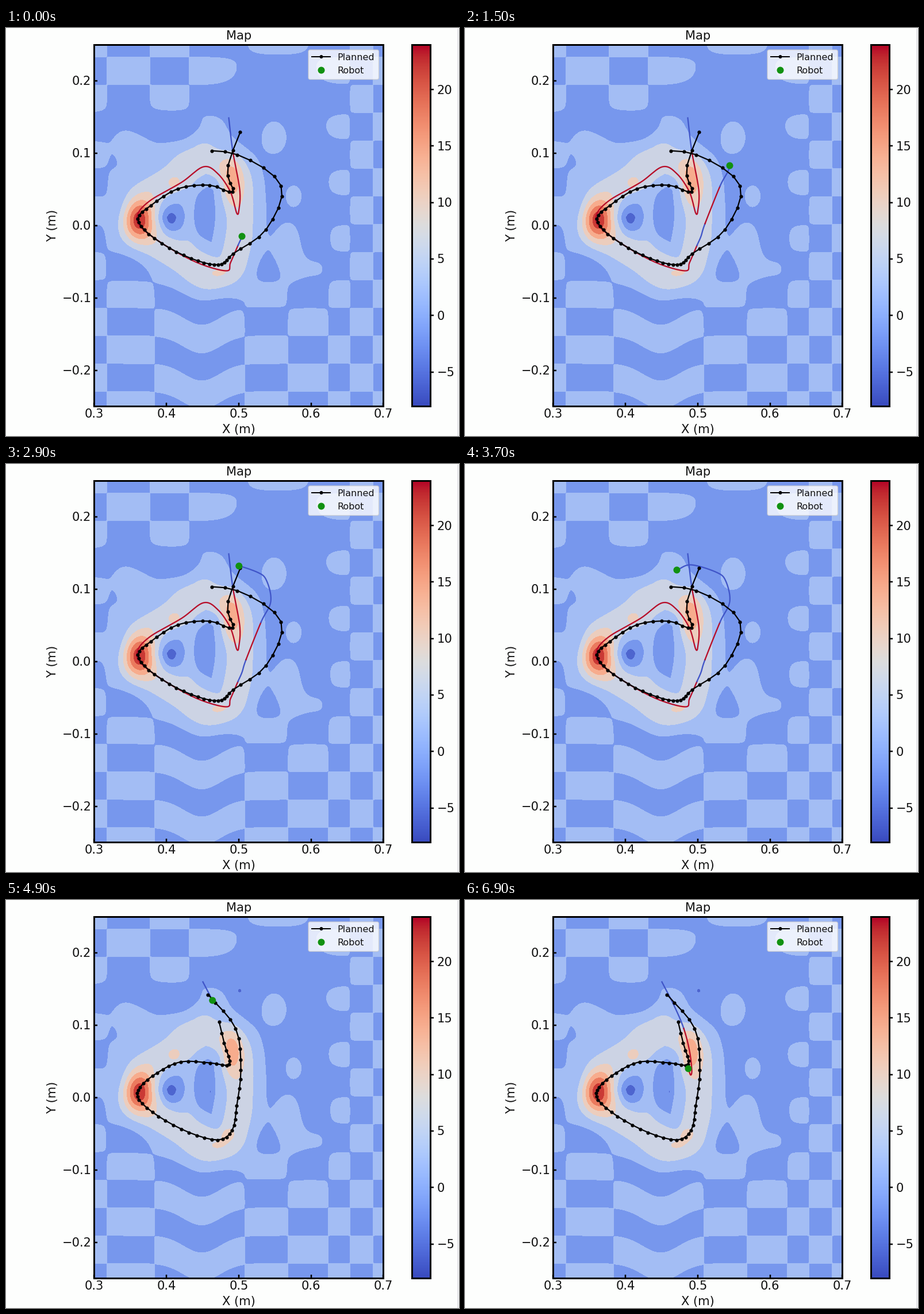
These frames come from a looping animation (788x710 px, 7000 ms). A matplotlib script:

```python
import matplotlib.pyplot as plt
import numpy as np
from matplotlib.animation import FuncAnimation
from matplotlib.patches import Circle, FancyBboxPatch, Rectangle

W, H, DPI = 788, 710, 100
PX = 72 / DPI
LEFT, RIGHT, TOP, BOTTOM = 153, 656, 28, 657
FRAMES, STEP_MS = 70, 100
REPLAN, RESTART = 41, 45
GREEN = "#119111"

plt.rcParams["font.family"] = "DejaVu Sans"
cmap = plt.get_cmap("coolwarm")

fig = plt.figure(figsize=(W / DPI, H / DPI), dpi=DPI, facecolor="#fdfefd")
ax = fig.add_axes([0, 0, 1, 1])
ax.axis("off")


def spline(keys, n):
    """Smooth curve through the keys, n samples per span."""
    p = np.array(keys, float)
    m = np.gradient(p, axis=0)
    t = np.linspace(0, 1, n, endpoint=False)[:, None]
    h = t * t * (3 - 2 * t)
    spans = [(1 - h) * p[i] + h * p[i + 1]
             + t * (1 - t) ** 2 * m[i] - t * t * (1 - t) * m[i + 1]
             for i in range(len(p) - 1)]
    return np.vstack(spans + [p[-1:]])


# ---- height map -------------------------------------------------------

X, Y = np.meshgrid(np.linspace(LEFT, RIGHT, 220), np.linspace(TOP, BOTTOM, 270))


def bump(x, y, sx, sy, height):
    return height * np.exp(-((X - x) / sx) ** 2 / 2 - ((Y - y) / sy) ** 2 / 2)


def plateau(x, y, rx, ry):
    return np.exp(-((X - x) / rx) ** 4 - ((Y - y) / ry) ** 4)


def ripples():
    """Checkered waves whose columns shift from top to bottom."""
    column = np.arange(-1, 8)
    upper = np.interp(X, [95, 175, 250, 318, 415, 530, 598, 638, 675], column)
    lower = np.interp(X, [95, 175, 258, 415, 490, 560, 598, 638, 675], column)
    w = np.clip((Y - 150) / 250, 0, 1)
    u = upper + (lower - upper) * w
    sag = 30 * w * np.exp(-((X - 340) / 45) ** 2)
    v = (Y - 50 - sag) / 48.5
    calm = np.maximum(plateau(470, 250, 95, 185), plateau(330, 320, 130, 110))
    waves = 1.8 * np.sin(np.pi * u) * np.sin(np.pi * v) * (1 - calm) - 1.8 * calm
    waves += bump(255, 170, 60, 15, -3) + bump(222, 215, 21, 18, 4)
    return np.clip(waves, -3, 3)


def ridge():
    """Raised band around a rounded triangle."""
    ring = spline([(345, 228), (397, 250), (408, 300), (404, 360), (390, 410),
                   (360, 420), (310, 398), (260, 372), (230, 335), (250, 290),
                   (300, 255), (345, 228)], 10)
    d2 = np.min([(X - x) ** 2 + (Y - y) ** 2 for x, y in ring], axis=0)
    return 8.4 * np.exp(-d2 / 1200)


def terrain():
    islands = (bump(466, 190, 17.5, 23, 3.6) + bump(500, 291, 10.6, 14, 3.6)
               + bump(490, 381, 18, 34, 3.6))
    peaks = (bump(232, 333, 17.5, 23, 16) + bump(391, 268, 12, 27, 8.5)
             + bump(293, 270, 7, 7, 4))
    hollow = bump(285, 333, 11, 15, -5) + bump(318, 325, 9, 40, 2.5)
    return ripples() + ridge() + islands + peaks + hollow


levels = np.arange(-8, 25, 4)
tones = cmap((levels[:-1] + 10) / 32)[:, :3] * [1, 0.975, 0.96]


def draw_map(height):
    return ax.contourf(X, Y, height, levels=levels, colors=tones,
                       extend="both", zorder=2)


ground = terrain()
new_spots = (bump(405.5, 157.5, 6, 6, -3.2) + bump(355, 333, 3, 6, -3.6)
             + bump(383, 405, 8, 7, 2.5))
first_map, second_map = draw_map(ground), draw_map(ground + new_spots)


# ---- axes, colour bar, legend ------------------------------------------

def text(x, y, s, size=21, **kw):
    ax.text(x, y, s.replace("-", "\u2212"), fontsize=size * PX, color="#111111",
            zorder=12, **kw)


def segment(xs, ys, color="black", width=2.5):
    ax.plot(xs, ys, color=color, lw=width * PX, solid_capstyle="butt", zorder=11)


def border(x0, x1):
    ax.add_patch(Rectangle((x0, TOP), x1 - x0, BOTTOM - TOP, fill=False,
                           ec="black", lw=3 * PX, zorder=11))


def draw_axes():
    border(LEFT, RIGHT)
    text(404.5, 19, "Map", ha="center")
    text(404.5, 704, "X (m)", ha="center")
    text(81, 343, "Y (m)", ha="center", va="center", rotation=90)
    for i in range(5):
        x = LEFT + i * (RIGHT - LEFT) / 4
        text(x, 677.5, f"{0.3 + 0.1 * i:.1f}", ha="center")
        segment([x, x], [BOTTOM, BOTTOM - 6])
        y = 91 + 126 * i
        text(148, y + 7.5, f"{(2 - i) / 10:.1f}", ha="right")
        segment([LEFT, LEFT + 6], [y, y])


def draw_colorbar():
    ramp = np.linspace(1, 0, 256)[:, None]
    ax.imshow(ramp, cmap=cmap, vmin=0, vmax=1, extent=(706, 738, BOTTOM, TOP),
              aspect="auto", interpolation="bilinear", zorder=3)
    border(706, 738)
    for v in range(-5, 21, 5):
        y = BOTTOM - (v + 8) * (BOTTOM - TOP) / 32
        segment([738, 744], [y, y])
        text(749, y + 7.5, str(v))


def draw_legend():
    ax.add_patch(FancyBboxPatch((528.5, 40.5), 116.5, 45.5,
                                boxstyle="round,pad=3", fc="white", ec="#cccccc",
                                alpha=0.8, lw=1.3 * PX, zorder=9))
    segment([531, 565], [49.5, 49.5], width=2)
    ax.add_patch(Circle((548, 49.5), 3, fc="black", zorder=12))
    ax.add_patch(Circle((548, 73), 6, fc=GREEN, zorder=12))
    text(576, 55, "Planned", 16)
    text(576, 78.5, "Robot", 16)


draw_axes()
draw_colorbar()
draw_legend()
segment([785.5, 785.5], [0, H], "#dcdce2", 1.5)


# ---- paths and motion ----------------------------------------------------

first_plan = spline([(312, 212), (402, 220), (478, 274), (452, 350), (395, 392),
                     (375, 410), (344, 408), (296, 389), (248, 358), (229, 331),
                     (252, 308), (299, 279), (354, 273), (394, 284), (386, 238),
                     (435, 114)], 4)[2:-2]
second_plan = spline([(351, 164), (399, 223), (408, 295), (401, 357), (393, 400),
                      (368, 417), (318, 404), (265, 376), (231, 347), (233, 325),
                      (263, 300), (304, 281), (355, 283), (388, 285), (379, 248),
                      (360, 169)], 4)[:-2]


class Trail:
    """Driven path, blue and red in turn, revealed along its length."""
    SAMPLES = 12

    def __init__(self, keys, turns, timing):
        self.points = spline(keys, self.SAMPLES)
        steps = np.hypot(*np.diff(self.points, axis=0).T)
        self.length = np.concatenate([[0], np.cumsum(steps)])
        self.bounds = [self.length_at(k) for k in [0, *turns, len(keys) - 1]]
        self.frames = [frame for frame, _ in timing]
        self.reach = [self.length_at(k) for _, k in timing]
        self.lines = [ax.plot([], [], color=cmap(0.99 if i % 2 else 0.02),
                              lw=2.3 * PX, zorder=6)[0]
                      for i in range(len(turns) + 1)]

    def length_at(self, key):
        return self.length[round(key * self.SAMPLES)]

    def at(self, s):
        return np.array([np.interp(s, self.length, c) for c in self.points.T])

    def show(self, frame):
        s = np.interp(frame, self.frames, self.reach)
        for line, a, b in zip(self.lines, self.bounds, self.bounds[1:]):
            a, b = min(a, s), min(b, s)
            inner = (self.length > a) & (self.length < b)
            line.set_data(*np.vstack([self.at(a), self.points[inner], self.at(b)]).T)
            line.set_visible(b > a)
        return self.at(s)

    def hide(self):
        for line in self.lines:
            line.set_visible(False)


loop = Trail(
    [(387, 156), (394, 214), (406, 280), (405, 314), (401, 322), (390, 285),
     (368, 253), (343, 241), (305, 268), (250, 300), (228, 325), (235, 347),
     (280, 380), (335, 409), (383, 422), (390, 408), (403, 378), (410, 362),
     (417, 340), (443, 275), (460, 239), (453, 203), (437, 188), (393, 175),
     (368, 184)],
    turns=[1, 16, 18, 19],
    timing=[(0, 17), (15, 20), (22, 22), (37, 24)])
descent = Trail(
    [(342, 142), (364, 185), (380, 223), (390, 262), (394, 295), (392, 304),
     (388, 293)],
    turns=[2],
    timing=[(RESTART, 0), (56, 2.25), (69, 6)])

plan, = ax.plot([], [], "k-o", lw=2.2 * PX, ms=6.2 * PX, mew=0, zorder=7)
robot = Circle((0, 0), 6, fc=GREEN, ec="none", zorder=8)
ax.add_patch(robot)

# whole numbers fall on pixel centres
ax.set_xlim(-0.5, W - 0.5)
ax.set_ylim(H - 0.5, -0.5)


def draw(frame):
    replanned = frame >= REPLAN
    first_map.set_visible(not replanned)
    second_map.set_visible(replanned)
    plan.set_data(*(second_plan if replanned else first_plan).T)
    pos = loop.show(frame)
    descent.hide()
    if replanned:
        loop.hide()
    if frame >= RESTART:
        pos = descent.show(frame)
    robot.center = tuple(pos)
    return [first_map, second_map, plan, robot, *loop.lines, *descent.lines]


anim = FuncAnimation(fig, draw, frames=FRAMES, interval=STEP_MS, repeat=True,
                     repeat_delay=0, blit=False)
plt.show()
```
